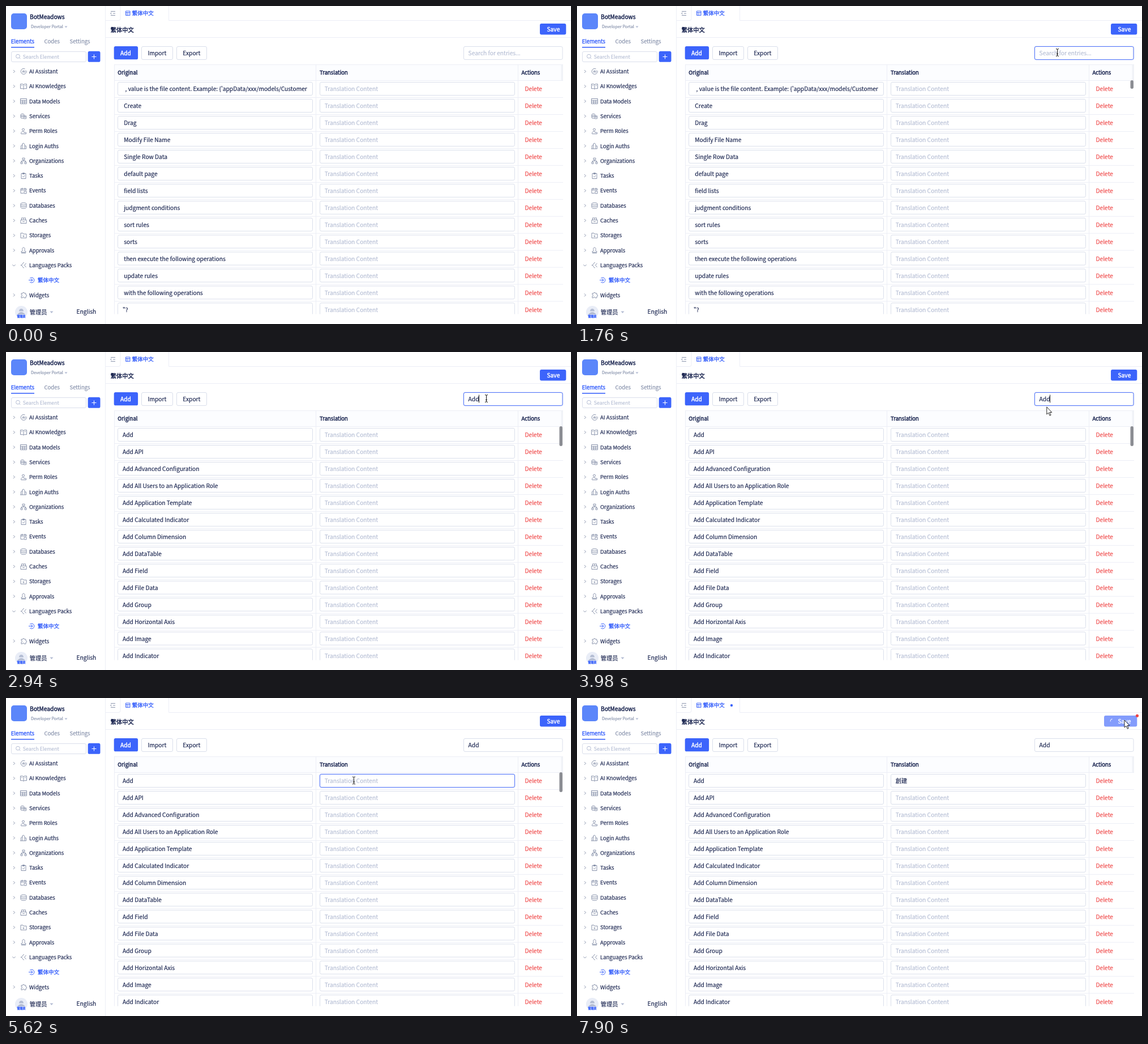
Recreate the animation shown at these times as an HTML page. Size 998 by 561 pixels, loop 8000 ms.

```html
<!DOCTYPE html>
<html lang="zh-CN">
<head>
<meta charset="utf-8">
<style>
  html, body { margin: 0; width: 100%; height: 100%; overflow: hidden; background: #fff; }
  svg { display: block; width: 100vw; height: 100vh; }
  text { font: 10.23px "Noto Sans CJK SC", "Noto Sans CJK", "Noto Sans", sans-serif; stroke: currentColor; stroke-width: .14px; }
  .medium { stroke-width: .4px; }
  .line { fill: none; stroke: #eceef6; }
  .box { fill: #fff; stroke: #dadfeb; }
  .icon { fill: none; stroke: #7d88a3; stroke-width: .9; stroke-linejoin: round; }
</style>
</head>
<body>
<svg id="stage" viewBox="0 0 998 561"></svg>
<script>
const BLUE = '#3c64fb', NAVY = '#141f4b', GRAY = '#7f8aa6', PALE = '#b3bcd3', RED = '#ef4444';
const LOOP = 8000, ROW = 29.955;
const FILTER = 2440, MATCH = 2940, SWITCH = 4830, PASTE = 5900, SAVE = 7150;

const label = (s, x, y, { size = 10.23, fill = NAVY, medium = false, id = '' } = {}) =>
  `<text x="${x}" y="${y}" fill="currentColor" style="font-size:${size}px;color:${fill}"` +
  `${medium ? ' class="medium"' : ''}${id && ` id="${id}"`}>${s}</text>`;
const rect = (x, y, w, h, attrs = '') => `<rect x="${x}" y="${y}" width="${w}" height="${h}" ${attrs}/>`;
const path = (d, attrs = 'class="line"') => `<path d="${d}" ${attrs}/>`;
const input = (x, y, w, h = 23) => rect(x, y, w, h, 'rx="2.5" class="box"');
const ring = (id, x, y, w) => `<g id="${id}" fill="none" stroke="${BLUE}">` +
  rect(x - 1, y - 1, w + 2, 25, 'rx="3.5" stroke-opacity=".1"') +
  rect(x, y, w, 23, 'rx="2.5" stroke-opacity=".85"') + '</g>';
const caret = id => rect(0, 0, 1, 14, `id="${id}" fill="#222"`);

const menu = [
  ['AI Assistant', 'M8.5 1.5A5 5 0 1 0 11 4.5M4 8l1.5-4L7 8M4.5 6.8h2M8.5 4v4'],
  ['AI Knowledges', 'M.5 2h4L6 3l1.5-1h4v8h-4L6 11l-1.5-1h-4zM6 3v8M2 4.5h2M8 4.5h2'],
  ['Data Models', 'M.5 1.5h11v9H.5zM.5 4.5h11M.5 7.5h11M4.5 4.5v6M8 4.5v6'],
  ['Services', 'M1 3.5a3 1.5 0 0 1 6 0v5a3 1.5 0 0 1-6 0zM1 5h6M1 7h6M7 5.5h3.5v5H6M7 7.5h3.5'],
  ['Perm Roles', 'M3.5 3.5a2 2 0 1 0 4 0a2 2 0 1 0-4 0M1.5 10.5c0-5 6-4 6-2M6.5 8.5h4V11h-9'],
  ['Login Auths', 'M1.5 11V5.5L4 4M4 11V2l2-1 2 2v8M8 6h2.5v5H0'],
  ['Organizations', 'M4 1h4v3H4zM1 8h3v3H1zM8 8h3v3H8zM6 4v2M2.5 8V6h7v2'],
  ['Tasks', 'M2 2h8v9H2zM4.5 1h3v2h-3zM4 7l1.5 1.5L8 5.5'],
  ['Events', 'M6 10.5H1v-8h10V5H1M3.5 1v3M8.5 1v3M7 7h4v4H7z'],
  ['Databases', 'M1 3a5 2 0 0 1 10 0a5 2 0 0 1-10 0v6a5 2 0 0 0 10 0V3M1 6a5 2 0 0 0 10 0'],
  ['Caches', 'M2.5 5V1.5h7V5M1 5h10v6H1zM4 8h4M5 3.2h2'],
  ['Storages', 'M1 2h4l1 1.5h5v7H1zM6 5.5v3M4.5 7L6 8.5 7.5 7'],
  ['Approvals', 'M4.5 6.5C3 4 4 1 6 1s3 3 1.5 5.5L10 8v1.5H2V8zM2 11h8'],
  ['Languages Packs', 'M7 1.5C3.5 1 5 6 1 6c4 0 2.5 5 6 4.5M10.5 2.5L7.5 6l3 3.5'],
  null,
  ['Widgets', 'M2 3h2.5a1.5 1.5 0 1 1 3 0H10v2.5a1.5 1.5 0 1 1 0 3V11H7a1.5 1.5 0 0 0-3 0H2V8a1.5 1.5 0 0 0 0-3z']
];
const allEntries = [", value is the file content. Example: {'appData/xxx/models/Customer",
  'Create', 'Drag', 'Modify File Name', 'Single Row Data', 'default page', 'field lists',
  'judgment conditions', 'sort rules', 'sorts', 'then execute the following operations',
  'update rules', 'with the following operations', '"?'];
const matches = ['', ' API', ' Advanced Configuration', ' All Users to an Application Role',
  ' Application Template', ' Calculated Indicator', ' Column Dimension', ' DataTable', ' Field',
  ' File Data', ' Group', ' Horizontal Axis', ' Image', ' Indicator'].map(s => 'Add' + s);

function sidebar() {
  let s = rect(9, 13, 28, 28, 'rx="5" fill="#5b86fa"') +
    label('BotMeadows', 42, 23.4, { medium: true }) +
    label('Developer Portal', 44, 39.3, { size: 7.3, fill: GRAY }) +
    path('M103.5 35.5h5l-2.5 3z', `fill="${PALE}"`) +
    label('Elements', 8.7, 65.7, { size: 9.5, fill: BLUE, medium: true }) +
    label('Codes', 67.5, 65.7, { size: 9.5, fill: GRAY }) +
    label('Settings', 112.5, 65.7, { size: 9.5, fill: GRAY }) +
    rect(9, 72, 41, 1.6, `fill="${BLUE}"`) +
    input(9.5, 80.5, 132, 18) +
    `<circle cx="21" cy="88.7" r="3.4" fill="none" stroke="${PALE}"/>` +
    path('M23.5 91.2l2 2', `stroke="${PALE}"`) +
    label('Search Element', 29.8, 92.7, { size: 8.77, fill: PALE }) +
    rect(144.7, 79.8, 21.8, 19, `rx="2.9" fill="${BLUE}"`) +
    path('M151.5 89.5h8M155.5 85.5v8', 'stroke="#fff"');
  menu.forEach((item, i) => {
    const y = 115.4 + 26.3 * i;
    if (!item) {
      s += path(`M42 ${y - 3}a4.5 4.5 0 1 1 0 6M40 ${y}h7m-2.5-2.5l2.5 2.5-2.5 2.5`, `fill="none" stroke="${BLUE}"`) +
        label('繁体中文', 56, y + 3.7, { size: 9.5, fill: BLUE, medium: true });
      return;
    }
    const chevron = i === 13 ? `M11.5 ${y - 1}l2.5 2.5 2.5-2.5` : `M13 ${y - 2.5}l2.5 2.5-2.5 2.5`;
    s += path(chevron, 'class="icon"') +
      path(item[1], `class="icon" transform="translate(25 ${y - 6})"`) +
      label(item[0], 41, y + 3.6, { size: 9.5 });
  });
  return s + `<circle cx="27" cy="540" r="11" fill="#e9edf7"/>` +
    path('M23 538.5a4 4.5 0 0 1 8 0zM20 544q7-8 14 0z', 'fill="#b4bdd3"') +
    label('管理员', 19.5, 549, { size: 5, fill: BLUE, medium: true }) +
    label('管理员', 41.8, 543.6) +
    path('M77.5 538.5h6l-3 3.5z', `fill="${PALE}"`) +
    label('English', 124.5, 543.3) + path('M175.5 0V561');
}

function header() {
  return path('M176 25.5H199Q202 25.5 202 22.5V0M287.5 0V25.5H998M176 55.5H998') +
    path('M185 9.5h8M189 13h4M185 16.5h8M186.5 11.5l-2 1.5 2 1.5', 'class="icon"') +
    path('M211.5 9h7.5v7.5h-7.5zM211.5 11.5h7.5M214 11.5v5M216 14h1.5', `fill="none" stroke="${BLUE}"`) +
    label('繁体中文', 222.7, 16.4, { size: 9.5, fill: BLUE, medium: true }) +
    `<circle id="dirtyTab" cx="273" cy="13" r="2.2" fill="${BLUE}"/>` +
    label('繁体中文', 184.8, 45.6, { medium: true }) +
    `<g id="saveButton">` + rect(943, 31, 46.3, 19.5, `id="saveBox" rx="2.9" fill="${BLUE}"`) +
    label('Save', 955.5, 44.6, { fill: '#fff', medium: true }) +
    path('M942.2 41.5A4 4 0 0 1 945.5 37', 'id="spinner" fill="none" stroke="#fff"') + '</g>' +
    `<circle id="dirtySave" cx="989.5" cy="31.3" r="2.6" fill="${RED}"/>` +
    rect(190.7, 70.9, 42.4, 23.4, `rx="2.9" fill="${BLUE}"`) +
    label('Add', 202, 86.7, { fill: '#fff', medium: true }) +
    input(239.5, 71.5, 55) + label('Import', 250.5, 86.7) +
    input(301.5, 71.5, 53) + label('Export', 312.3, 86.7) +
    input(808.5, 71.5, 174.5) + ring('searchRing', 808.5, 71.5, 174.5) +
    label('', 816.6, 86.7, { id: 'query' }) + caret('searchCaret');
}

function table() {
  const entries = (list, id) => `<g id="${id}">` + list.map((s, i) => {
    const indent = id === 'full' && i < 13 ? (i ? 2.3 : 4.6) : 0;
    return label(s, 206 + indent, 150.2 + ROW * i);
  }).join('') + '</g>';
  let s = rect(191, 104, 793, 27, 'fill="#fcfdff"') + rect(980.5, 104, 3.5, 27, 'fill="#f0f2f7"') +
    path('M191 103.5H984M191.5 104V544M547.5 104V544M904.5 104V544M191 131.5H984') +
    label('Original', 197.3, 120.6, { size: 9.5, medium: true }) +
    label('Translation', 554, 120.6, { size: 9.5, medium: true }) +
    label('Actions', 910.5, 120.6, { size: 9.5, medium: true });
  for (let i = 0; i < 14; i++) {
    const y = 134.5 + ROW * i;
    s += input(197.5, y, 344) + input(554.5, y, 344) + path(`M191 ${y + 27}H984`) +
      label('Translation Content', 562.7, y + 15.7, { fill: PALE, id: i ? '' : 'cell' }) +
      label('Delete', 916.5, y + 15.7, { fill: RED });
  }
  return `<clipPath id="view">${rect(176, 100, 822, 443.5)}</clipPath><g clip-path="url(#view)">` +
    s + entries(allEntries, 'full') + entries(matches, 'filtered') + ring('cellRing', 554.5, 134.5, 344) +
    caret('cellCaret') + rect(977.5, 131, 5.5, 15, 'id="thumb" rx="2.7" fill="#8b8d93"') + '</g>';
}

const pointer = '<g id="pointer">' +
  path('M-2.5-6.5Q0-6.5 0-5V5Q0 6.5-2.5 6.5M2.5-6.5Q0-6.5 0-5M0 5Q0 6.5 2.5 6.5M-1.5 2.5h3', 'id="beam" fill="none" stroke="#111"') +
  path('M0 0V13L3 10.3 5.3 15.3 7.3 14.3 5 9.6H9z', 'id="arrow" fill="#fff" stroke="#111" stroke-width=".9" stroke-linejoin="round"') +
  '</g>';

document.getElementById('stage').innerHTML = rect(0, 0, 998, 561, 'fill="#fff"') +
  sidebar() + header() + table() + pointer;

const $ = id => document.getElementById(id);
const set = (id, attrs) => { for (const k in attrs) $(id).setAttribute(k, attrs[k]); };
const show = (id, on) => $(id).setAttribute('opacity', +on);
const write = (id, s, color) => { $(id).textContent = s; $(id).style.color = color; };
const clamp = v => Math.min(1, Math.max(0, v));
const ease = p => p < .5 ? 4 * p ** 3 : 1 - 4 * (1 - p) ** 3;
const within = (t, a, b) => t >= a && t < b;

// Each move: start, end, then the three points of a quadratic curve.
const moves = [
  [60, 780, [772, 449], [820, 266], [848.5, 82]],
  [3800, 4520, [848.5, 82], [700, 205], [584, 148]],
  [5200, 6340, [584, 148], [628, 152], [985.5, 54.5]],
  [6580, 7100, [985.5, 54.5], [986, 46], [967, 39]]
];
function pointerAt(t) {
  const [a, b, p, q, r] = moves.findLast(m => t >= m[0]) || moves[0];
  const u = ease(clamp((t - a) / (b - a))), v = 1 - u;
  return p.map((c, i) => v * v * c + 2 * u * v * q[i] + u * u * r[i]);
}

function drawRing(id, focus, hover) {
  show(id, Math.max(focus, hover ? .6 : 0));
  $(id).firstChild.setAttribute('opacity', focus);
}

function draw(t) {
  const [x, y] = pointerAt(t);
  const overSearch = within(x, 808, 983) && within(y, 71, 95);
  const row = Math.floor((y - 134.5) / ROW);
  const overCell = within(x, 554, 899) && row >= 0 && (y - 134.5) % ROW < 24;

  show('pointer', t >= 60);
  set('pointer', { transform: `translate(${x} ${y})` });
  show('beam', overSearch || overCell);
  show('arrow', !overSearch && !overCell);

  drawRing('searchRing', clamp((t - 1270) / 120) * clamp((SWITCH + 60 - t) / 60), t >= 60 && overSearch);
  const cellFocus = clamp((t - SWITCH) / 60) * clamp((SAVE + 100 - t) / 100);
  const hoverCell = t >= 60 && overCell;
  set('cellRing', { transform: `translate(0 ${hoverCell && !cellFocus ? row * ROW : 0})` });
  drawRing('cellRing', cellFocus, hoverCell);

  const typed = t >= MATCH ? 'Add' : t >= FILTER ? 'A' : '';
  write('query', typed || 'Search for entries...', typed ? NAVY : PALE);
  set('searchCaret', { x: t >= MATCH ? 835 : t >= FILTER ? 823 : 817, y: 75.5 });
  show('searchCaret', within(t, 1270, 1760) || within(t, FILTER, 3370) || within(t, 3870, 4330));

  show('full', t < FILTER);
  show('filtered', t >= FILTER);
  set('thumb', { height: t >= MATCH ? 35 : 15 });
  show('thumb', clamp((t - 60) / 200) * clamp((SAVE + 200 - t) / 200));

  const pasted = t >= PASTE;
  write('cell', pasted ? '創建' : 'Translation Content', pasted ? NAVY : PALE);
  set('cellCaret', { x: pasted ? 583.5 : 563, y: 139 });
  show('cellCaret', within(t, SWITCH, 5330) || within(t, PASTE, 6340));
  show('dirtyTab', pasted);
  show('dirtySave', pasted);

  const saving = t >= SAVE;
  show('saveButton', saving ? .63 : 1);
  set('saveBox', { x: saving ? 931 : 943, width: saving ? 58.3 : 46.3 });
  show('spinner', saving);
  set('spinner', { transform: `rotate(${(t - 7900) * .36} 946 41)` });
}

const begin = performance.now();
function tick() {
  draw((performance.now() - begin) % LOOP);
  requestAnimationFrame(tick);
}
tick();
</script>
</body>
</html>
```
